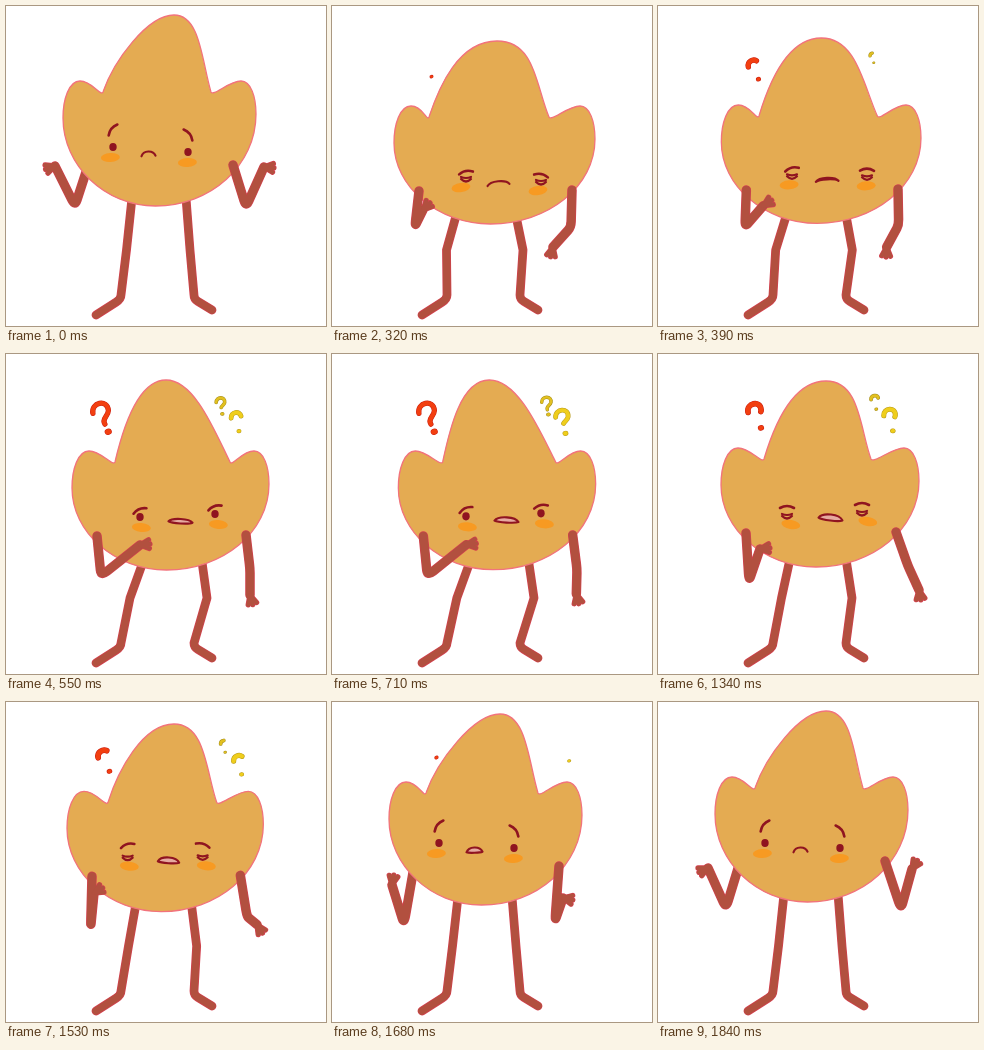
These frames come from a looping animation (320 px wide and 320 px high, 1.92 s). An HTML page with a canvas:

```html
<!DOCTYPE html>
<html lang="en">
<head>
<meta charset="utf-8">
<title>Puzzled flame</title>
<style>
html, body { margin: 0; width: 100%; height: 100%; overflow: hidden; background: #fff; }
canvas { display: block; width: 100vw; height: 100vh; }
</style>
</head>
<body>
<canvas id="stage"></canvas>
<script>
const SIZE = 320, LOOP = 1920, STEP = 80;
const SKIN = '#e4ab52', RIM = '#f2737c', LIMB = '#b2503f', LIMB_RIM = '#d4404f';
const INK = '#8f1420', BLUSH = '#f79a22', TONGUE = '#e6aaa0';

const canvas = document.getElementById('stage');
const ctx = canvas.getContext('2d');
const ratio = window.devicePixelRatio || 1;
canvas.width = canvas.height = SIZE * ratio;

// body:  tip x, tip y, valleys x, sides x, lobe y, bottom y
// legs:  hips x, knee bends
// arms:  elbow, wrist, hand direction
// face:  left eye, drop of the right eye, turn of the head, eyes open
// brows: lift, left angle, right angle;  mouth: half width, arch, gap
const rest = {
  body: [168,9, 97,205, 57,250, 75,200],
  legs: [126,180, 0,0],
  armL: [69,200, 49,160, 2.8],
  armR: [240,201, 258,161, .1],
  face: [107,141, 5, -2, 1],
  brows: [17, -.9, .9],
  mouth: [7, 6, 0]
};
const slump = {
  body: [165,35, 97,217, 62,263, 100,218],
  legs: [124,184, -5,5],
  armL: [83,220, 91,204, -.8],
  armR: [239,221, 221,241, 1.8],
  face: [134,171, 3, -5, 0],
  brows: [4, -.2, .2],
  mouth: [11, 5, 0]
};
const ponder = {
  body: [160,26, 109,224, 66,263, 97,216],
  legs: [137,196, -2,9],
  armL: [95,222, 134,191, -.1],
  armR: [244,215, 244,241, 1.3],
  face: [134,163, -3, 3, 1],
  brows: [6, -.4, -.35],
  mouth: [12, 4, 6]
};
const doubt = {
  body: [152,26, 114,223, 67,265, 97,215],
  legs: [140,198, -1,11],
  armL: [96,222, 135,190, -.15],
  armR: [247,215, 245,238, 1.4],
  face: [134,161, -3, 3, 1],
  brows: [7, -.5, 0],
  mouth: [12, 8, 9]
};
const sigh = {
  body: [168,27, 106,213, 63,261, 94,213],
  legs: [132,188, 0,6],
  armL: [91,227, 102,195, -.1],
  armR: [250,212, 261,236, 1.4],
  face: [129,160, -3, 6, 0],
  brows: [6, 0, 0],
  mouth: [12, 6, 8]
};
const recover = {
  ...rest,
  body: [168,12, 94,206, 57,250, 80,203],
  armL: [72,222, 60,183, -1.4],
  armR: [223,219, 231,196, .2],
  mouth: [8, 6, 7]
};
const shrug = {
  ...rest,
  armL: [68,206, 50,166, 2.7],
  armR: [243,207, 254,167, -1]
};
const poses = [rest, slump, ponder, doubt, sigh, recover, shrug];

// time, position in the pose list, number of steps to the next entry
const keys = [
  [0, 0, 1], [320, 1, 1], [390, 4/3, 2], [550, 2, 6], [1030, 3, 4],
  [1340, 4, 1], [1530, 13/3, 2], [1680, 5, 2], [1840, 6, 1]
];

const marks = [
  { x: 97, y: 64, size: .92, turn: -.3, born: .85, gone: 3.5, fill: '#f23f10', rim: '#c81c10' },
  { x: 215, y: 52, size: .54, turn: -.1, born: 1.05, gone: 3.3, fill: '#e2c020', rim: '#a08a1c' },
  { x: 231, y: 68, size: .8, turn: -.15, born: 1.4, gone: 3.5, fill: '#efce1c', rim: '#b8991a' }
];

const clamp = v => Math.min(1, Math.max(0, v));
const mix = (a, b, k) => Array.isArray(a) ? a.map((v, i) => mix(v, b[i], k)) : a + (b - a) * k;

function progress(t) {
  const i = keys.findLastIndex(key => key[0] <= t);
  const [at, from, count] = keys[i];
  const step = Math.min(count - 1, Math.floor((t - at) / STEP));
  return step ? mix(from, keys[i + 1][1], step / count) : from;
}

function poseAt(u) {
  const i = Math.min(Math.floor(u), poses.length - 2), pose = {};
  for (const part in rest) pose[part] = mix(poses[i][part], poses[i + 1][part], u - i);
  return pose;
}

function stroke(color, width) {
  ctx.strokeStyle = color;
  ctx.lineWidth = width;
  ctx.stroke();
}

function oval(x, y, rx, ry, color, turn = 0) {
  ctx.beginPath();
  ctx.ellipse(x, y, rx, ry, turn, 0, Math.PI * 2);
  ctx.fillStyle = color;
  ctx.fill();
}

// Runs the drawing inside a moved and turned frame.
function within(x, y, turn, paint) {
  ctx.save();
  ctx.translate(x, y);
  ctx.rotate(turn);
  paint();
  ctx.restore();
}

function drawBody([tipX, tipY, valleyL, valleyR, left, right, lobe, bottom]) {
  const blunt = 28 + (190 - bottom + tipY) * 1.5;  // a squashed flame has a wider tip
  const valley = lobe + 11, shoulder = valley - (valley - tipY) * .4;
  const base = (left + right) / 2 - 4, low = mix(lobe + 35, bottom, .55);
  const lobeL = left + 17, lobeR = right - 15;
  ctx.beginPath();
  ctx.moveTo(tipX, tipY);
  ctx.bezierCurveTo(tipX + blunt, tipY, mix(valleyR, tipX, .25), shoulder, valleyR, valley);
  ctx.bezierCurveTo(valleyR + 2, valley + 5, lobeR - 12, lobe, lobeR, lobe);
  ctx.bezierCurveTo(right - 5, lobe, right, lobe + 16, right, lobe + 33);
  ctx.bezierCurveTo(right, low, mix(base, right, .55), bottom, base, bottom);
  ctx.bezierCurveTo(mix(base, left, .55), bottom, left, low, left, lobe + 37);
  ctx.bezierCurveTo(left, lobe + 18, left + 6, lobe, lobeL, lobe);
  ctx.bezierCurveTo(lobeL + 12, lobe, valleyL - 2, valley + 5, valleyL, valley);
  ctx.bezierCurveTo(mix(valleyL, tipX, .15), shoulder, tipX - blunt, tipY, tipX, tipY);
  ctx.fillStyle = SKIN;
  ctx.fill();
  stroke(RIM, 1.3);
}

function drawLeg(hipX, hipY, bend, ankleX, toeX, toeY) {
  const ankleY = 293;
  ctx.beginPath();
  ctx.moveTo(hipX, hipY);
  ctx.lineTo((hipX + ankleX) / 2 + bend, 244);
  ctx.lineTo(ankleX, ankleY - 4);
  ctx.quadraticCurveTo(ankleX, ankleY, mix(ankleX, toeX, .2), mix(ankleY, toeY, .2));
  ctx.lineTo(toeX, toeY);
  stroke(LIMB_RIM, 8.8);
  stroke(LIMB, 7.4);
}

function drawArm(x, y, [elbowX, elbowY, wristX, wristY, aim]) {
  for (const [color, grow] of [[LIMB_RIM, 1.3], [LIMB, 0]]) {
    ctx.beginPath();
    ctx.moveTo(x, y);
    ctx.lineTo(mix(elbowX, x, .15), mix(elbowY, y, .15));
    ctx.quadraticCurveTo(elbowX, elbowY, mix(elbowX, wristX, .15), mix(elbowY, wristY, .15));
    ctx.lineTo(wristX, wristY);
    stroke(color, 8.2 + grow);
    ctx.beginPath();
    for (const finger of [-.45, 0, .45]) {
      ctx.moveTo(wristX, wristY);
      ctx.lineTo(wristX + 10 * Math.cos(aim + finger), wristY + 10 * Math.sin(aim + finger));
    }
    stroke(color, 4 + grow);
  }
}

function drawEye(x, y, open) {
  if (open > .5) return oval(x, y, 3.7, 4.1, INK);
  ctx.beginPath();
  for (const [dip, dy] of [[2, 0], [7, 2]]) {
    ctx.moveTo(x - 5, y + dy);
    ctx.quadraticCurveTo(x, y + dip, x + 5, y + dy);
  }
  stroke(INK, 2.2);
}

function drawFace([x, y, drop, turn, open], [lift, ...angles], [wide, arch, gap]) {
  [-1, 1].forEach((side, i) => {
    const ex = x + 75 * i, ey = y + drop * i;
    oval(ex + turn * .8 + side, ey + 10.5, 9.5, 4.5, BLUSH, turn * .03);
    drawEye(ex, ey, open);
    within(ex, ey - lift, angles[i], () => {
      ctx.beginPath();
      ctx.moveTo(-7, 0);
      ctx.quadraticCurveTo(0, -4, 7, 0);
      stroke(INK, 2.6);
    });
  });
  within(x + 37.5 + turn, y + drop / 2 + 6.5, turn * .02, () => {
    ctx.beginPath();
    ctx.moveTo(-wide, 0);
    ctx.bezierCurveTo(-wide * .7, -arch, wide * .7, -arch, wide, 0);
    ctx.bezierCurveTo(wide * .7, gap - arch, -wide * .7, gap - arch, -wide, 0);
    ctx.fillStyle = TONGUE;
    if (gap > 1) ctx.fill();
    stroke(INK, 2.2);
  });
}

// A question mark is written from its top, then melts back to a drifting dot.
function drawMark({ x, y, size, turn, born, gone, fill, rim }, u) {
  const grow = clamp((u - born) / 1.1), fade = clamp((u - gone) / 1.6);
  const life = Math.min(grow, 1 - fade);
  if (life <= 0) return;
  const scale = size * (.4 + .6 * grow) * (1 - .5 * fade);
  const shown = Math.min(grow, 1 - fade * 1.1), length = 47;
  within(x + 5 * fade, y - 18 * fade * fade, turn, () => {
    ctx.scale(scale, scale);
    for (const [color, edge] of [[rim, 1], [fill, 0]]) {
      if (shown > .2) {
        ctx.beginPath();
        ctx.moveTo(-9, -8);
        ctx.bezierCurveTo(-8, -20, 11, -19, 8, -6);
        ctx.bezierCurveTo(6, 0, -2, 0, 0, 7);
        ctx.setLineDash([length * shown, 200]);
        stroke(color, 4.6 * (2 - life) + edge / scale);
        ctx.setLineDash([]);
      }
      const r = 3.4 + edge / 2 / scale;
      oval(1, 16, r, r * .85, color);
    }
  });
}

function draw(u) {
  const { body, legs, armL, armR, face, brows, mouth } = poseAt(u);
  const [, , , , left, right, lobe, bottom] = body;
  const armBehind = u < 1 || u > 4.5;
  const paintLeft = () => drawArm(left + 25, lobe + 85, armL);
  ctx.setTransform(ratio, 0, 0, ratio, 0, 0);
  ctx.fillStyle = '#fff';
  ctx.fillRect(0, 0, SIZE, SIZE);
  ctx.lineCap = ctx.lineJoin = 'round';
  drawLeg(legs[0], bottom - 8, legs[2], 115, 90, 309);
  drawLeg(legs[1], bottom - 8, legs[3], 188, 206, 304);
  if (armBehind) paintLeft();
  drawBody(body);
  drawFace(face, brows, mouth);
  if (!armBehind) paintLeft();
  drawArm(right - 23, lobe + 84, armR);
  for (const mark of marks) drawMark(mark, u);
}

const start = performance.now();
function tick() {
  draw(progress((performance.now() - start) % LOOP));
  requestAnimationFrame(tick);
}
tick();
</script>
</body>
</html>
```
